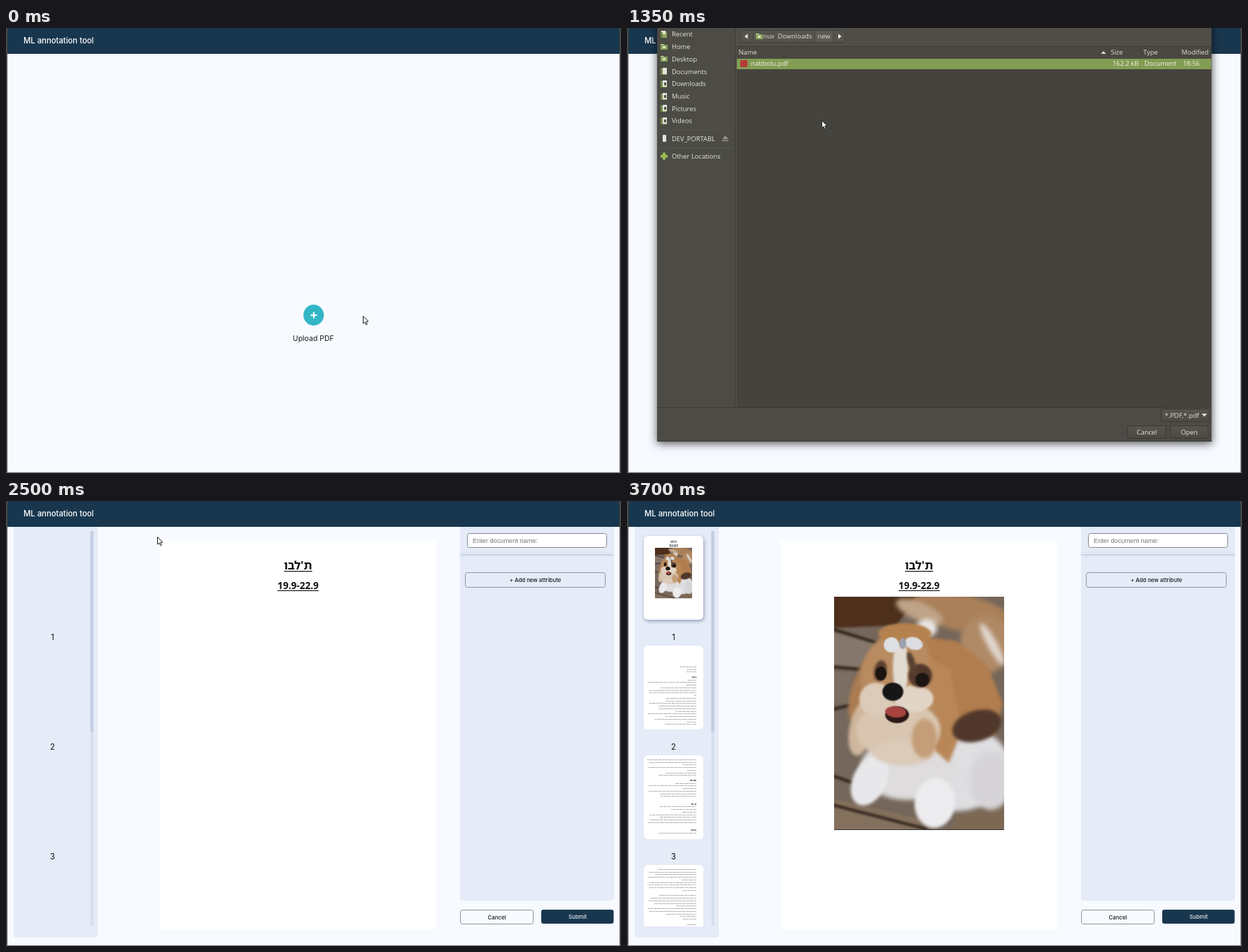
An HTML page with a canvas that plays this animation: 879x637 px, repeating every 4.3 s.

```html
<!DOCTYPE html>
<html lang="en">
<head>
<meta charset="utf-8">
<title>ML annotation tool</title>
<style>
  html, body { margin: 0; width: 100%; height: 100%; overflow: hidden; background: #f7faff; }
  canvas { display: block; width: 100vw; height: 100vh; }
</style>
</head>
<body>
<canvas id="stage" width="879" height="637"></canvas>
<script>
const LOOP = 4300, STEP = 50;
const NAVY = '#18374f', PANEL = '#e5ebf7', PAGE = '#f7faff';
const UI = 'Inter, sans-serif';
const DIALOG = '9.4px "Open Sans", sans-serif';
const HEBREW = '"Noto Sans Hebrew", "Noto Sans", "DejaVu Sans", sans-serif';
const stage = document.getElementById('stage').getContext('2d');
let c = stage;

function rect(x, y, w, h, fill) {
  c.fillStyle = fill;
  c.fillRect(x, y, w, h);
}

function box(x, y, w, h, r, fill, stroke) {
  c.beginPath();
  c.roundRect(x, y, w, h, r);
  if (fill) { c.fillStyle = fill; c.fill(); }
  if (stroke) { c.strokeStyle = stroke; c.lineWidth = 1; c.stroke(); }
}

function shape(points, fill) {
  c.beginPath();
  points.forEach(([x, y]) => c.lineTo(x, y));
  c.closePath();
  c.fillStyle = fill;
  c.fill();
}

function oval(x, y, rx, ry, fill, turn = 0) {
  c.beginPath();
  c.ellipse(x, y, rx, ry, turn, 0, Math.PI * 2);
  c.fillStyle = fill;
  c.fill();
}

function text(s, x, y, font, fill, align = 'left') {
  c.font = font;
  c.fillStyle = fill;
  c.textAlign = align;
  c.fillText(s, x, y);
}

function shadow(color, blur, dx = 0, dy = 0) {
  c.shadowColor = color;
  c.shadowBlur = blur;
  c.shadowOffsetX = dx;
  c.shadowOffsetY = dy;
}

const noShadow = () => shadow('transparent', 0);

function paintPlanks() {
  rect(296, 137, 243, 333, '#75675b');
  c.filter = 'blur(3px)';
  shape([[290, 130], [420, 130], [385, 178], [290, 182]], '#4d2f1b');
  shape([[290, 188], [370, 205], [330, 240], [290, 236]], '#85776b');
  shape([[290, 245], [325, 245], [320, 290], [290, 290]], '#7c6e62');
  shape([[290, 425], [420, 455], [420, 480], [290, 480]], '#84715d');
  shape([[470, 450], [545, 432], [545, 480], [460, 480]], '#7c6853');
  c.strokeStyle = '#2f221a';
  c.lineWidth = 4;
  for (const [y, slope, end] of [[182, 22, 360], [237, 4, 335], [299, -8, 325], [392, 12, 325], [434, 36, 430]]) {
    c.beginPath();
    c.moveTo(290, y);
    c.lineTo(end, y + slope);
    c.stroke();
  }
}

function paintBody() {
  c.filter = 'blur(7px)';
  oval(478, 160, 74, 26, '#a98059', 0.2);
  oval(512, 205, 36, 42, '#b08a66');
  oval(418, 158, 36, 13, '#c0a488', 0.4);
  oval(522, 205, 7, 34, '#e0d6cd', -0.5);
  oval(428, 182, 15, 13, '#eae7e6');
  oval(470, 382, 78, 62, '#dfdee1');
  oval(400, 382, 66, 46, '#dedcdd');
  oval(520, 400, 30, 42, '#d6d4d7');
  c.filter = 'blur(4px)';
  oval(347, 400, 24, 38, '#e8e7ea', 0.45);
  oval(440, 432, 29, 36, '#ecebed', 0.1);
}

function paintHead() {
  c.filter = 'blur(5px)';
  oval(342, 265, 19, 55, '#ab7c52', 0.35);
  oval(396, 255, 62, 70, '#b98b60');
  oval(335, 325, 17, 40, '#cfb79d', 0.2);
  shape([[425, 195], [470, 200], [515, 235], [537, 290], [525, 335], [480, 340], [455, 300]], '#b27d4e');
  shape([[430, 225], [462, 240], [478, 330], [460, 375], [432, 350], [440, 290]], '#b98757');
  oval(500, 322, 36, 22, '#4f382b', -0.3);
  oval(388, 328, 60, 42, '#d9c6b1');
  oval(395, 360, 44, 18, '#dccbb9');
  oval(425, 340, 18, 28, '#c49e78');
  c.filter = 'blur(3px)';
  oval(391, 238, 11, 42, '#e2dbd4');
  oval(410, 283, 28, 19, '#e2d5c7');
  oval(356, 284, 24, 24, '#dccbb9');
  oval(397, 190, 38, 15, '#b5824f');
  oval(362, 243, 9, 15, '#5a4031', 0.2);
  oval(419, 250, 17, 17, '#54392b', -0.2);
  oval(407, 232, 5, 17, '#5a4232', -0.3);
}

function paintFace() {
  c.filter = 'blur(1.5px)';
  oval(363, 247, 8, 10, '#1b1411');
  oval(422, 256, 10, 10, '#1b1411');
  oval(380, 273, 15, 13, '#171617');
  oval(386, 306, 17, 12, '#2a1714');
  oval(384, 302, 15, 8, '#a84440', 0.1);
  oval(378, 206, 11, 11, '#dedfe3', -0.3);
  oval(410, 204, 13, 9, '#dcdde1', 0.3);
  oval(394, 204, 5, 8, '#9aa2ad');
}

// Soft picture of a dog lying on planks, painted once.
function paintPhoto() {
  const scale = 2, canvas = document.createElement('canvas');
  canvas.width = 243 * scale;
  canvas.height = 333 * scale;
  c = canvas.getContext('2d');
  c.scale(scale, scale);
  c.translate(-296, -137);
  paintPlanks();
  paintBody();
  paintHead();
  paintFace();
  c = stage;
  return canvas;
}

const photo = paintPhoto();

function underlined(s, y, font) {
  text(s, 417.5, y, font, '#111', 'center');
  const w = c.measureText(s).width;
  rect(417.5 - w / 2, y + 1.7, w, 1.2, '#111');
}

function pageContent(withPhoto) {
  underlined("ת'לבו", 98.3, `bold 16.5px ${HEBREW}`);
  underlined('19.9-22.9', 126, 'bold 13.6px "Noto Sans", sans-serif');
  if (!withPhoto) return;
  c.drawImage(photo, 296, 137, 243, 333);
  rect(296, 470, 243, 1, '#333');
}

function chrome() {
  rect(0, 0, 879, 637, PAGE);
  rect(0, 0, 879, 37, NAVY);
  text('ML annotation tool', 25, 21.7, `500 11.3px ${UI}`, '#fff');
}

function edges() {
  rect(0, 0, 2, 637, '#4c4b46');
  rect(877, 0, 2, 637, '#4c4b46');
  rect(0, 636, 879, 1, '#6c6c69');
}

function upload() {
  oval(439.7, 411, 14.6, 15, '#32b6c6');
  rect(435.5, 410, 9, 2.2, '#fff');
  rect(438.9, 406.6, 2.2, 9, '#fff');
  text('Upload PDF', 439.3, 447.8, `10.5px ${UI}`, '#16191d', 'center');
}

const places = ['Recent', 'Home', 'Desktop', 'Documents', 'Downloads', 'Music', 'Pictures', 'Videos'];

function folderIcon(x, y) {
  rect(x, y - 4, 5, 2, '#c8d3ae');
  rect(x, y - 3, 10, 7, '#89a557');
  rect(x + 3, y - 1, 4, 3, '#dfe4d2');
}

function placeIcon(i, y) {
  if (i === 1 || i === 2) return folderIcon(48, y);
  rect(48, y - 4, 9, 9, '#8aa65a');
  rect(i === 0 ? 49 : 51, y - 5, 6, i === 0 ? 5 : 9, '#e4e4de');
  rect(48, y - 3, 3, 8, '#6f8945');
  if (i > 3) rect(53, y - 2, 3, 4, '#53524c');
}

function sideList() {
  const ink = '#e6e5df';
  places.forEach((name, i) => {
    const y = 9 + i * 17.72;
    placeIcon(i, Math.round(y));
    text(name, 64, y + 3.4, DIALOG, ink);
  });
  rect(44, 145, 110, 1, '#55534d');
  rect(44, 171, 110, 1, '#55534d');
  box(51, 153, 5, 10, 1, '#e4e4e0');
  text('DEV_PORTABL', 64, 161.6, DIALOG, ink);
  shape([[136, 159], [140.5, 154], [145, 159]], '#96948c');
  rect(136, 160.5, 9, 1.5, '#96948c');
  rect(48, 181.5, 10, 4, '#9cbb55');
  rect(51, 178.5, 4, 10, '#9cbb55');
  text('Other Locations', 64, 187, DIALOG, ink);
}

function pathBar(dimArrow) {
  const ink = '#dedcd4';
  box(162.5, 3.5, 149, 17, 3, '#55534c', '#3f3e39');
  rect(269, 4, 25, 16, '#5d5b54');
  for (const x of [180, 210, 268, 294]) rect(x, 4, 1, 16, '#4a4842');
  shape([[168, 12], [172.5, 8.5], [172.5, 15.5]], '#f0efe9');
  shape([[306.5, 12], [302, 8.5], [302, 15.5]], dimArrow ? '#aaa8a0' : '#f4f3ee');
  folderIcon(184, 12);
  text('nuv', 194.5, 15.3, DIALOG, ink);
  text('Downloads', 215.5, 15.3, DIALOG, ink);
  text('new', 272.5, 15.3, DIALOG, ink);
}

function dialogButton(label, x, y, w, border = '#3a3934') {
  const fill = c.createLinearGradient(0, y, 0, y + 18);
  fill.addColorStop(0, '#57554d');
  fill.addColorStop(1, '#4b4942');
  box(x + .5, y + .5, w, 18, 3, fill, border);
  if (label) text(label, x + w / 2 + .5, y + 12.6, DIALOG, '#e6e5df', 'center');
}

function dialog(t) {
  const ink = '#e2e0d8';
  shadow('rgba(0,0,0,.65)', 12, 0, 3);
  rect(43, -20, 792.5, 612, '#4d4b45');
  noShadow();
  rect(43, 0, 112, 543, '#4c4b45');
  rect(155, 0, 680, 27, '#504e47');
  rect(157, 26, 678, 18, '#4a4842');
  rect(157, 26, 678, 1, '#3c3b36');
  rect(157, 44, 678, 499, '#45433e');
  rect(154, 0, 1, 543, '#3b3a35');
  rect(155, 0, 2, 543, '#504e48');
  rect(43, 543, 792, 1, '#3b3a35');
  sideList();
  pathBar(t >= 1450);

  const hover = t >= 1450 && t < 1600;
  text('Name', 159.5, 38.2, DIALOG, hover ? '#fff' : ink);
  shape([[677.5, 37], [681, 33], [684.5, 37]], ink);
  text('Size', 691.5, 38.2, DIALOG, ink);
  text('Type', 738, 38.2, DIALOG, ink);
  text('Modified', 792.5, 38.2, DIALOG, ink);
  for (const x of [688, 734, 788]) rect(x, 28, 1, 15, '#413f3a');

  rect(157, 44, 678, 15, '#839d53');
  rect(162, 46, 10, 10, '#b63a35');
  text('nabbolu.pdf', 177, 54.4, DIALOG, '#f1f1e8');
  text('162.2 kB', 694, 54.4, DIALOG, '#f1f1e8');
  text('Document', 739.5, 54.4, DIALOG, '#f1f1e8');
  text('18:56', 794.5, 54.4, DIALOG, '#f1f1e8');

  dialogButton('', 763, 545, 69);
  text('*.PDF,*.pdf', 768.5, 557.6, DIALOG, ink);
  shape([[821.5, 552], [829, 552], [825.2, 556.5]], ink);
  dialogButton('Cancel', 715, 569, 55);
  dialogButton('Open', 776, 569, 54, t >= 2000 ? '#727748' : '#3a3934');
  rect(43, 591, 793, 1, '#3b3a35');
}

// Each character is one line: its width in steps, h for a heading, a space for a gap.
const pages = [
  { top: 207, first: 238, lines: '322 h292799166977496826', from: 2750 },
  { top: 364, first: 371, lines: '9939267 h493977  h7539799  h7', from: 2750 },
  { top: 521, first: 528, lines: '798939993 7998499633 28', from: 2900 }
];
const filler = 'שורה של מילים קטנות מאוד שאין בהן שום דבר מיוחד מלבד אותיות '.repeat(3);

function thumbText({ first, lines }) {
  [...lines].forEach((mark, i) => {
    if (mark === ' ') return;
    const bold = mark === 'h';
    const count = bold ? 6 : Math.round(mark * 7.4 - i % 3);
    const start = (i * 7) % 40;
    text(filler.slice(start, start + count).trim(), 99, first + i * 3.74,
      `${bold ? 'bold 2.8' : '2.2'}px ${HEBREW}`, bold ? '#000' : '#222', 'right');
  });
}

function sidebar(t) {
  box(11, 37, 120, 588, [0, 0, 4, 4], PANEL);
  if (t < 2500) return;
  box(120.5, 43, 4.5, 565, 2, '#d7dfee');
  box(120.5, 43, 4.5, 288, 2, '#c4cee2');
  for (let n = 1; n <= 3; n++) text(n, 66.5, 42 + n * 157, `11.3px ${UI}`, '#111', 'center');
  if (t >= 2600) {
    shadow('rgba(50,75,120,.5)', 5, 1, 2);
    box(24, 50, 85, 120, 6, '#fff');
    noShadow();
    c.save();
    c.translate(24, 50);
    c.scale(.2152, .2152);
    c.translate(-220, -56);
    pageContent(true);
    c.restore();
  }
  c.save();
  c.beginPath();
  c.rect(11, 37, 120, 572);
  c.clip();
  for (const p of pages) {
    if (t < p.from) continue;
    box(24, p.top, 85, 120, 6, '#fff');
    thumbText(p);
  }
  c.restore();
}

function attributePanel() {
  box(649, 37, 220, 535, [0, 0, 4, 4], PANEL);
  shadow('rgba(70,90,130,.4)', 3, 0, 1);
  rect(649, 74, 220, 2, PANEL);
  noShadow();
  box(659.5, 46.5, 199, 20, 3, '#fff', '#858b94');
  text('Enter document name:', 667, 59.8, '9.2px "Liberation Sans", Arial, sans-serif', '#757575');
  const label = `500 7.8px ${UI}`;
  box(656.5, 102.5, 200, 21, 3, null, '#8d949f');
  text('+ Add new attribute', 756.5, 116, label, '#16191d', 'center');
  box(649.5, 585.5, 104, 20, 3, PAGE, '#8d949f');
  text('Cancel', 701.5, 598.6, label, '#16191d', 'center');
  box(765, 585, 103.5, 20, 3, NAVY);
  text('Submit', 817, 598.2, label, '#e4eaf1', 'center');
}

function editor(t) {
  sidebar(t);
  rect(220, 56, 395, 557, '#fff');
  if (t >= 2500) pageContent(t >= 2550);
  attributePanel();
}

// Pointer stops: time, x, y.
const track = [
  [100, 510, 412], [450, 437.5, 413], [1050, 437.5, 413], [1500, 222, 34], [1600, 221, 45],
  [1750, 216, 51], [2900, 216, 51], [3400, 74, 6], [3650, 42, 0]
];

function pointerAt(t) {
  const next = track.findIndex(stop => stop[0] >= t);
  if (next < 0) return null;
  const b = track[next], a = track[Math.max(0, next - 1)];
  const k = b === a ? 0 : (t - a[0]) / (b[0] - a[0]);
  const e = k * k * (3 - 2 * k);
  return [a[1] + (b[1] - a[1]) * e, a[2] + (b[2] - a[2]) * e];
}

function pointer(t) {
  const at = pointerAt(t);
  if (!at) return;
  c.save();
  c.translate(Math.round(at[0]) + .5, Math.round(at[1]) + .5);
  shape([[0, 0], [0, 10.5], [2.4, 8.4], [4.1, 12.2], [5.9, 11.4], [4.2, 7.8], [7.4, 7.5]], '#fff');
  c.strokeStyle = '#1c1c1c';
  c.lineWidth = 1;
  c.stroke();
  c.restore();
}

function draw(now) {
  const t = Math.floor((now % LOOP) / STEP) * STEP;
  chrome();
  if (t < 2350) upload();
  else editor(t);
  if (t >= 650 && t < 2300) dialog(t);
  edges();
  pointer(t);
}

const begin = performance.now();
function tick() {
  draw(performance.now() - begin);
  requestAnimationFrame(tick);
}
tick();
</script>
</body>
</html>
```
